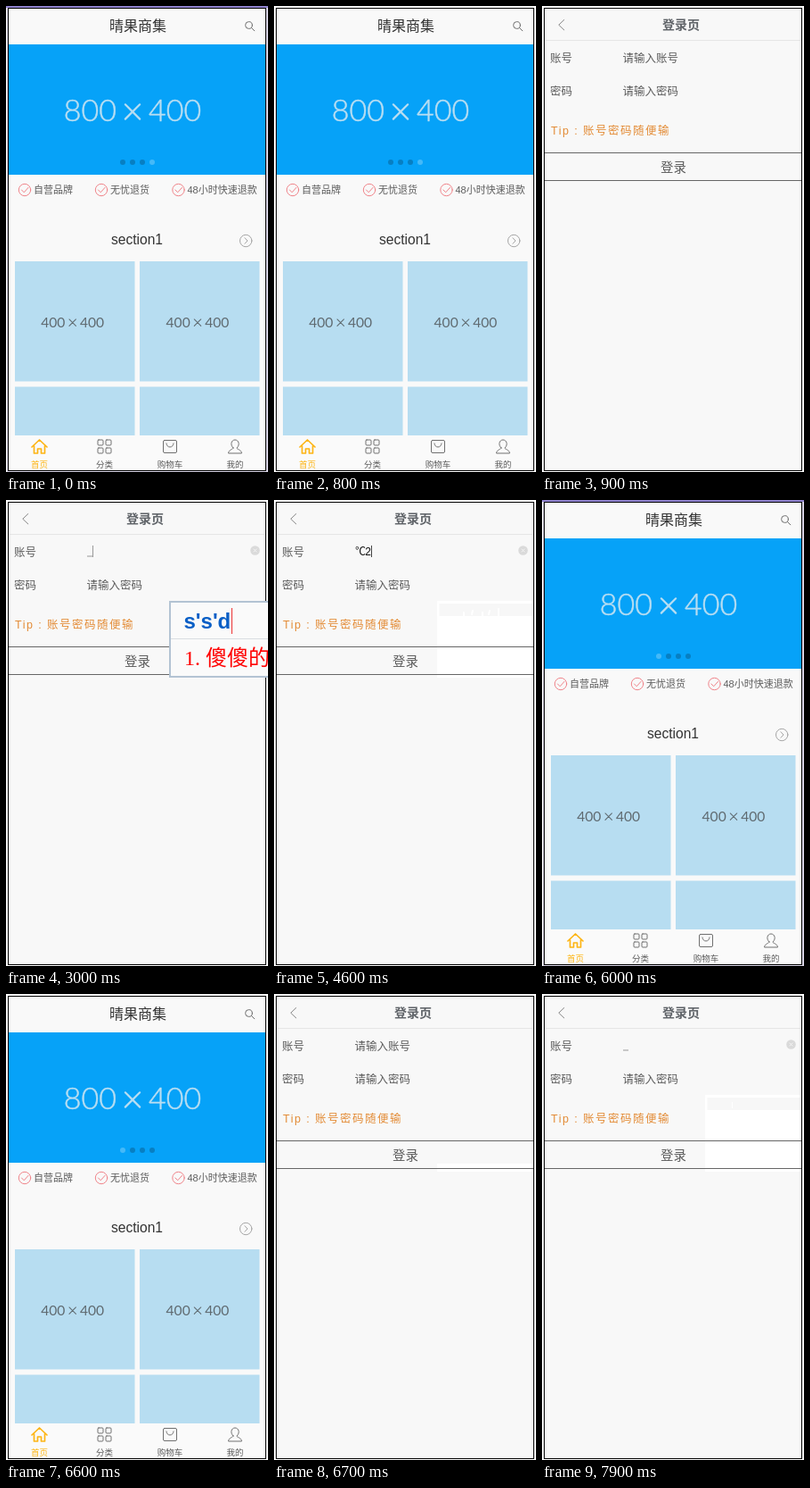
Write an HTML page that moves like this. It is 294 px wide and 522 px high and loops after 8 s.

```html
<!DOCTYPE html>
<html lang="zh-CN">
<head>
<meta charset="utf-8">
<title>登录演示</title>
<style>
html, body { margin: 0; width: 100%; height: 100%; overflow: hidden; background: #fff; }
svg { display: block; width: 294px; height: 522px; }
text { font-family: "Liberation Sans", "Noto Sans CJK SC", "Noto Sans CJK", sans-serif; fill: #5c5c5c; white-space: pre; }
.num { font-family: Lato, "Open Sans", sans-serif; }
.line { fill: none; stroke: #707070; stroke-width: 1; stroke-linecap: round; stroke-linejoin: round; }
</style>
</head>
<body>
<svg id="stage" viewBox="0 0 294 522" xmlns="http://www.w3.org/2000/svg"></svg>
<script>
const LOOP = 8000;
const stage = document.getElementById('stage');

const rect = (x, y, w, h, fill, more = '') =>
  `<rect x="${x}" y="${y}" width="${w}" height="${h}" fill="${fill}" ${more}/>`;
const text = (x, y, size, label, more = '') =>
  `<text x="${x}" y="${y}" font-size="${size}" ${more}>${label}</text>`;
const path = (d, more = '') => `<path class="line" d="${d}" ${more}/>`;
const circle = (x, y, r, more) => `<circle cx="${x}" cy="${y}" r="${r}" ${more}/>`;
const fill = color => `style="fill:${color}"`;
const stroke = color => `style="stroke:${color}"`;
const middle = 'text-anchor="middle"';

// Placeholder picture label such as "400 × 400"
function sizeLabel(x, y, size, width, color, more) {
  const style = `class="num" ${fill(color)} ${more}`;
  const arm = size * 0.24;
  const cy = y - size * 0.31;
  return text(x - size * 0.53, y, size, width, `${style} text-anchor="end"`) +
    text(x + size * 0.53, y, size, '400', style) +
    path(`M${x - arm} ${cy - arm}l${2 * arm} ${2 * arm}m0 ${-2 * arm}l${-2 * arm} ${2 * arm}`,
      `style="stroke:${color};stroke-width:${size * 0.065}"`);
}

function service(x, label) {
  const red = stroke('#f0848a');
  return circle(x, 206, 6.7, `class="line" ${red}`) +
    path(`M${x - 3.5} 206l2.7 2.8 4.8-5.4`, red) +
    text(x + 10, 210, 11, label);
}

function card(x, y, h) {
  return rect(x, y, 134.5, h, '#b7ddf1');
}

function tab(x, label, icon, color) {
  return `<g transform="translate(${x} 493.5)">${icon}</g>` +
    text(x, 517, 9.5, label, `${middle} ${fill(color)}`);
}

function homeIcons() {
  const gold = 'style="stroke:#fdb515;stroke-width:1.7"';
  const squares = [[-7.5, -7.5], [1.5, -7.5], [-7.5, 1.5], [1.5, 1.5]]
    .map(([x, y]) => rect(x, y, 6, 6, 'none', 'class="line" rx="1"')).join('');
  return tab(37.5, '首页', path('M-8.5 .5L0-7.5 8.5 .5M-6-1V7.5H-2V2.5H2V7.5H6V-1', gold), '#fdb515') +
    tab(110.5, '分类', squares, '#5c5c5c') +
    tab(184, '购物车', rect(-7.5, -7, 15, 14, 'none', 'class="line" rx="1.5"') +
      path('M-4-3.5Q-3.5 .5 0 .5T4-3.5'), '#5c5c5c') +
    tab(257, '我的', path('M-2 1.5C-6-2-4-7.5 0-7.5S6-2 2 1.5C2 3.5 7 3 7.5 7.5H-7.5C-7 3-2 3.5-2 1.5Z'), '#5c5c5c');
}

function home({ dot }) {
  const dots = [0, 1, 2, 3].map(i =>
    circle(131 + 11 * i, 175, 3, `fill="${i === dot ? '#45b9f8' : '#077fc2'}"`)).join('');
  return rect(3, 3, 288, 518, '#f9f9f9') +
    text(148, 28, 16, '晴果商集', `${middle} ${fill('#333')}`) +
    circle(272.5, 21.5, 3.9, 'class="line"') + path('M275.5 24.5l3.3 3.3') +
    rect(3, 43, 288, 146, '#06a2f8') +
    sizeLabel(142, 129, 34, '800', '#b9def2', 'font-weight="300" stroke="#b9def2" stroke-width=".5"') + dots +
    service(21, '自营品牌') + service(107, '无忧退货') + service(193.5, '48小时快速退款') +
    text(147, 267, 15.6, 'section1', `${middle} ${fill('#333')}`) +
    circle(269.2, 263, 6.7, `class="line" ${stroke('#a5a5a5')}`) +
    path('M268 259.8l3 3.2-3 3.2', stroke('#a5a5a5')) +
    card(10, 286, 134.5) + card(150, 286, 134.5) +
    sizeLabel(74.7, 359.5, 15.6, '400', '#5f6a70', '') +
    sizeLabel(215, 359.5, 15.6, '400', '#5f6a70', '') +
    card(10, 426.5, 54.5) + card(150, 426.5, 54.5) +
    rect(3, 481, 288, 40, '#fafafa') + homeIcons();
}

function accountField({ value, caret, composing }) {
  const entered = value || composing;
  let out = entered ? '' : text(90.5, 62.5, 12.5, '请输入账号');
  if (value) {
    out += text(91, 62, 12, value[0], fill('#111')) +
      text(102.2, 62, 12, value.slice(1), fill('#111'));
  }
  if (composing) out += rect(91, 62.5, 6, 1, '#999');
  if (caret) out += rect(caret, 51, 1, 13, composing ? '#999' : '#444');
  if (entered) {
    out += circle(279.5, 56.5, 5.3, 'fill="#dadada"') +
      path('M278 55l3 3m0-3l-3 3', stroke('#f4f4f4'));
  }
  return out;
}

function leftover(kind) {
  if (kind === 'strip') return rect(183, 190, 108, 9, '#fff');
  if (!kind) return '';
  const marks = kind === 'long'
    ? path('M213 126v4m10-6l-1 4m12-2v4m8-6l-1 4m11-6v8', 'style="stroke:#fff;stroke-width:2"')
    : rect(213, 121, 1, 7, '#fff');
  return rect(183, 113, 108, 86, '#fff') + rect(185.5, 116, 105.5, 14, '#f7f7f7') + marks;
}

function inputPanel({ letters, word, cursor }) {
  return rect(184, 114, 130, 84, '#fafafa', 'stroke="#b3c3d3" stroke-width="2"') +
    rect(185, 155, 109, 1, '#d9dde1') +
    text(199.5, 144, 24, letters, `font-weight="bold" ${fill('#0a5fc6')}`) +
    rect(cursor, 121, 1, 29, '#e33') +
    text(200, 185, 24, '1.', 'style="fill:#f00;font-family:\'Liberation Serif\',serif"') +
    text(224, 185, 24, word, `font-weight="300" ${fill('#f00')}`);
}

function login(state) {
  return rect(3, 3, 288, 518, '#f8f8f8') +
    rect(3, 38, 288, 1, '#e6e6e6') +
    path('M24.8 15.5l-6 5.7 6 5.7', stroke('#888')) +
    text(156, 26, 14, '登录页', `${middle} font-weight="bold" ${fill('#5f6368')}`) +
    text(9, 62.5, 12.5, '账号') + accountField(state) +
    text(9, 99.5, 12.5, '密码') + text(90.5, 99.5, 12.5, '请输入密码') +
    leftover(state.residue) +
    text(10, 144, 12.5, 'Tip :', `letter-spacing="1.5" ${fill('#e38b35')}`) +
    text(46, 144, 12.5, '账号密码随便输', `letter-spacing="1.5" ${fill('#e38b35')}`) +
    rect(2, 164, 289, 1, '#666') + rect(2, 195, 289, 1, '#666') +
    text(147.5, 186, 14.4, '登录', middle);
}

function surround(focused) {
  return focused ? rect(1, 0, 293, 522, '#d9d5e6') + rect(0, 0, 294, 2, '#9184cf') : '';
}

const border = rect(2.5, 2.5, 289, 518, 'none', 'stroke="#000"');
const short = { letters: 's', word: '是', cursor: 213 };
const long = { letters: "s's'd", word: '傻傻的', cursor: 253 };
const typed = { page: login, residue: 'long' };
const steps = [
  [0, { page: home, dot: 3, focused: true }],
  [800, { page: home, dot: 3 }],
  [900, { page: login }],
  [2300, { page: login, caret: 91 }],
  [2700, { page: login }],
  [2900, { page: login, composing: true, caret: 97, panel: short }],
  [3000, { page: login, composing: true, caret: 97, panel: long }],
  [3500, { page: login, composing: true, panel: long }],
  [3800, { ...typed, value: '℃', caret: 103 }],
  [4200, { ...typed, value: '℃' }],
  [4600, { ...typed, value: '℃2', caret: 109 }],
  [4900, { ...typed, value: '℃22', caret: 115 }],
  [5400, { ...typed, value: '℃22' }],
  [5800, { ...typed, value: '℃22', caret: 115, focused: true }],
  [6000, { page: home, dot: 0, focused: true }],
  [6600, { page: home, dot: 0 }],
  [6700, { page: login, residue: 'strip' }],
  [7300, { page: login, composing: true, caret: 97, panel: short }],
  [7900, { page: login, composing: true, residue: 'short' }]
];

let shown = null;
function draw(time) {
  const state = steps.findLast(([start]) => start <= time)[1];
  if (state === shown) return;
  shown = state;
  stage.innerHTML = surround(state.focused) + state.page(state) + border +
    (state.panel ? inputPanel(state.panel) : '');
}

const begin = performance.now();
function tick() {
  draw((performance.now() - begin) % LOOP);
  requestAnimationFrame(tick);
}
tick();
</script>
</body>
</html>
```
